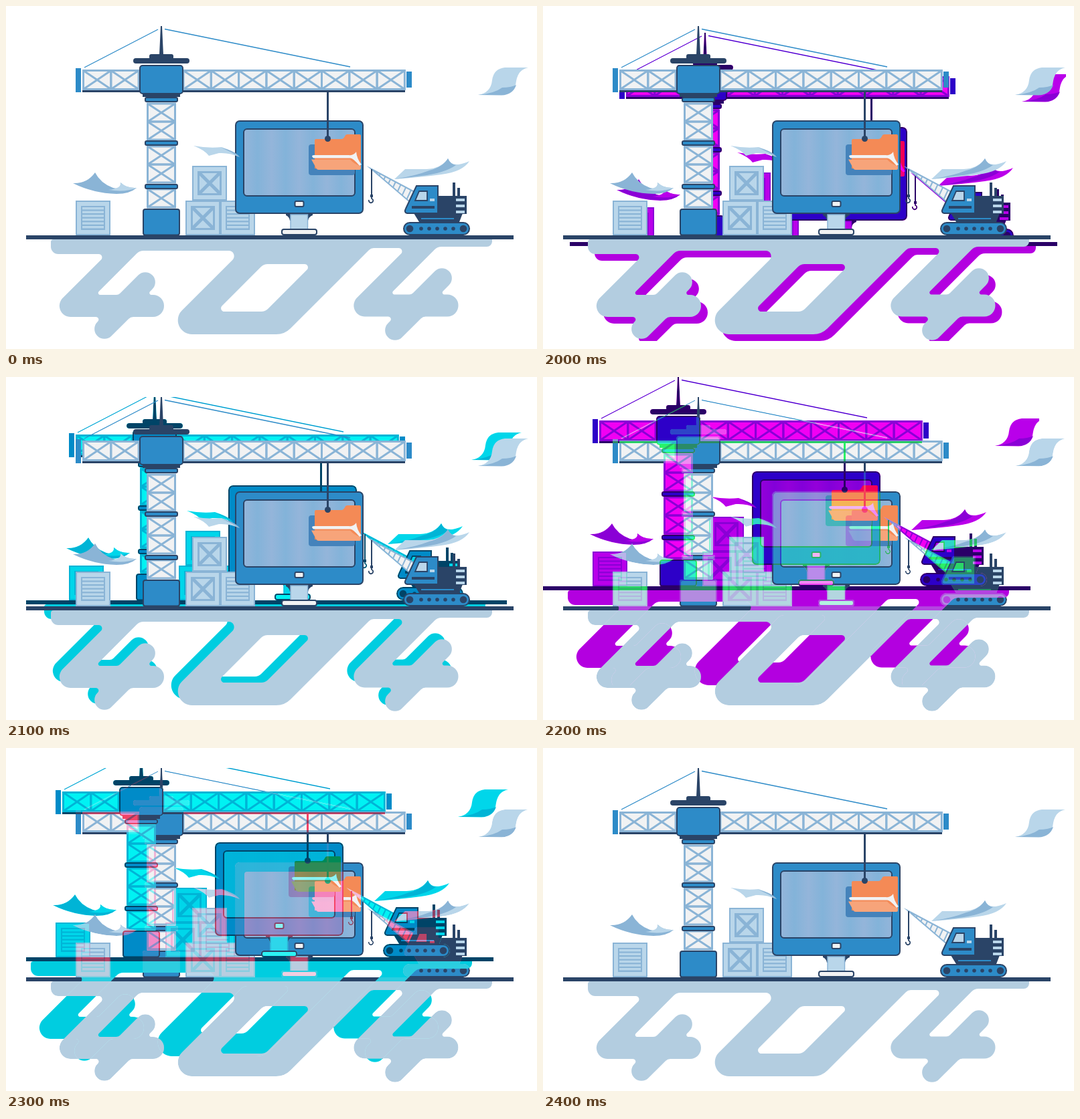
An HTML page with a canvas for the animation above (2500 ms loop, 793 px wide and 513 px high).

```html
<!DOCTYPE html>
<html lang="en">
<head>
<meta charset="utf-8">
<title>404</title>
<style>
  html, body { margin: 0; width: 100%; height: 100%; overflow: hidden; background: #fff; }
  canvas { display: block; width: 793px; height: 513px; }
</style>
</head>
<body>
<canvas id="stage" width="793" height="513"></canvas>
<script>
const W = 793, H = 513, LOOP = 2500;
const BLUE = '#2d8bc8', DARK = '#2a4467', MID = '#8ab4d6', LIGHT = '#b9d6ea',
      PALE = '#f1f2f3', GROUND = '#b3cde0', ORANGE = '#f48a56', PEACH = '#f7a47a';

function layer(paint) {
  const c = document.createElement('canvas');
  c.width = W;
  c.height = H;
  paint(c.getContext('2d'));
  return c;
}

let g;

function box(x, y, w, h, fill, r = 0, stroke, lw = 2) {
  g.beginPath();
  g.roundRect(x, y, w, h, r);
  if (fill) { g.fillStyle = fill; g.fill(); }
  if (stroke) { g.strokeStyle = stroke; g.lineWidth = lw; g.stroke(); }
}

function shape(d, fill, stroke, lw = 2) {
  const p = new Path2D(d);
  if (fill) { g.fillStyle = fill; g.fill(p); }
  if (stroke) { g.strokeStyle = stroke; g.lineWidth = lw; g.stroke(p); }
}

function dot(x, y, r, fill) {
  g.beginPath();
  g.arc(x, y, r, 0, 7);
  g.fillStyle = fill;
  g.fill();
}

// Cross-braced cell of a truss
function cell(x, y, w, h) {
  shape(`M${x},${y}l${w},${h}M${x + w},${y}l${-w},${h}`, null, MID, 3);
  box(x, y, w, h, null, 0, MID, 3);
}

// Polygon whose corners are [x, y, radius]
function rounded(pts) {
  const last = pts[pts.length - 1];
  g.moveTo((last[0] + pts[0][0]) / 2, (last[1] + pts[0][1]) / 2);
  pts.forEach(([x, y, r], i) => {
    const next = pts[(i + 1) % pts.length];
    g.arcTo(x, y, next[0], next[1], r);
  });
  g.closePath();
}

// All slanted edges lie on x + y = sum; a corner is where one meets height y
const at = (sum, y, r) => [sum - y, y, r];

// Round end of a slanted limb, pointing up right (dir 1) or down left (dir -1)
const tip = ([x, y], dir) => [[x + dir * 21, y, 14.8], [x, y - dir * 21, 14.8]];

// A four hanging from the bar, (x, y) is the left end of its crossbar
function four(x, y, tail, arm, barLeft, barRight) {
  const s = x + y, top = y - 16.5, bottom = y + 16.5;
  const ts = tail[0] + tail[1], as = arm[0] + arm[1];
  return [
    at(s - 24, barLeft, 5), at(s - 24, bottom, 16.5),
    at(ts - 21, bottom, 4), ...tip(tail, -1), at(ts + 21, bottom, 10),
    [x + 139, bottom, 16.4], [x + 139, top, 16.4],
    at(as + 21, top, 3), ...tip(arm, 1), at(as - 21, top, 8),
    at(s + 20, top, 3), at(s + 20, barRight, 14)
  ];
}

function digits() {
  g.beginPath();
  rounded([
    [67, 349, 4], [67, 371, 11],
    ...four(97, 448.5, [147, 483], [208, 413], 371, 366),
    at(718, 366, 8), at(718, 491, 21), at(907, 491, 30), at(907, 362, 10),
    ...four(536.5, 448, [581, 485], [651, 407], 362, 360),
    [726, 360, 8], [726, 349, 0]
  ]);
  rounded([at(771, 386, 14), at(844, 386, 5), at(844, 457, 14), at(771, 457, 5)]);
  g.fillStyle = GROUND;
  g.fill('evenodd');
}

function crate(x, y, slats) {
  box(x + 1, y + 1, 50, 50, LIGHT, 0, MID);
  if (slats) {
    box(x + 8, y + 8, 36, 36, MID);
    for (let i = 0; i < 6; i++) box(x + 10, y + 10 + i * 5.6, 32, 3.4, LIGHT);
  } else {
    shape(`M${x + 10},${y + 10}l32,32m0,-32l-32,32`, null, MID, 5);
    box(x + 9.5, y + 9.5, 33, 33, null, 0, MID, 3);
  }
}

function tower() {
  box(211, 140, 42, 165, PALE);
  for (let i = 0; i < 5; i++) cell(211.5, 146 + i * 27 + (i >> 1) * 10, 41, 27);
  box(205, 304, 54, 38.5, BLUE, 3, DARK);
  for (let y = 137; y < 270; y += 65) box(208, y, 48, 6, BLUE, 2, DARK);
  box(204, 130, 56, 6, DARK);
}

function truss(x, cells) {
  const step = 41.3;
  box(x, 96.5, step * cells, 28, PALE);
  for (let i = 0; i < cells; i++) cell(x + i * step, 96.5, step, 28);
}

function jib() {
  shape('M117,92L227,35M237,34.5L514,91', null, BLUE, 1.3);
  truss(115.5, 2);
  truss(265, 8);
  box(114, 126, 482, 3, DARK);
  box(104, 93, 8, 36, BLUE);
  box(598, 98, 8, 24, BLUE);
  box(200, 89, 64, 42, BLUE, 4, DARK);
  box(190, 78, 84, 8, DARK, 4);
  box(214, 72, 36, 8, DARK, 3);
  shape('M231,30H233L234,52L235,73H229L230,52Z', DARK);
}

function monitor() {
  box(343, 172, 190, 138, BLUE, 6, DARK);
  const glass = g.createLinearGradient(355, 0, 521, 0);
  for (let i = 0; i <= 8; i++) glass.addColorStop(i / 8, i % 2 ? '#83b3d9' : '#94b5da');
  box(355, 184, 166, 100, glass, 5, DARK);
  box(431.5, 292, 13, 8, PALE, 2, DARK);
  shape('M418,311H458V313Q452,315 451,321H424Q423,315 418,313Z', DARK);
  box(425, 312, 25.5, 22, LIGHT, 0, MID, 1.5);
  box(412, 334, 52, 8, PALE, 3, DARK);
}

function folder() {
  box(452, 207, 69, 46, '#4583bb', 4);
  shape('M461,201q0,-2 2,-2H501q3,0 5,-4q1,-3 4,-3H528q2,0 2,2V243H461Z', ORANGE);
  shape('M457,225q0,-2 3,-2L512,223Q519,224 523,218Q524,229 531,237L528,239Q518,227 514,227.5H459Z', PALE);
  shape('M456,229.5H514Q518,235 530,240V243q0,2 -2,2H467q-3,0 -4,-3Z', PEACH);
  box(479, 129, 3, 69, DARK);
  dot(480.5, 198.5, 4.5, DARK);
}

function digger() {
  // Boom and hook
  shape('M546,244L610,278L603,293Z', PALE, MID, 2);
  for (let t = 0.2; t < 1; t += 0.12) {
    shape(`M${546 + 64 * t},${244 + 34 * t}L${546 + 57 * t},${244 + 49 * t}`, null, MID, 2);
  }
  shape('M546,244V284', null, DARK, 2);
  box(544, 282, 4, 4, DARK);
  shape('M546,286V288A3.2,3.2 0 1 1 542,290', null, DARK, 1.8);

  // Engine and tracks
  box(667, 264, 4, 22, DARK);
  box(674, 272, 4, 14, DARK);
  box(644, 284, 44, 27, DARK);
  shape('M609,310H682L677,323H617Z', DARK);
  box(620, 317, 49, 2, BLUE);
  for (let y = 288; y < 310; y += 9) box(672, y, 13, 4, LIGHT);
  box(594, 324, 98, 18, BLUE, 9, DARK);
  for (const x of [603, 683]) dot(x, 333, 5.3, DARK);
  for (let x = 620; x < 670; x += 12) dot(x, 333, 2.8, DARK);

  // Cab
  shape('M613,269H645V310H599Q594,309 597,303Z', BLUE, DARK);
  shape('M617,277H629V291H611Z', LIGHT, DARK, 1.8);
  box(633, 288, 7, 4, LIGHT);
  box(606, 299, 34, 4, DARK);
}

function papers() {
  shape('M100,265Q121,266 133,249Q141,265 160,272Q172,275 171,264Q180,273 195,272Q185,281 165,281Q130,280 100,265Z', MID);
  shape('M171,264Q173,273 153,275Q178,279 195,272Q181,273 171,264Z', LIGHT);

  shape('M280,209Q302,213 322,211Q338,216 349,226Q334,219 318,220L303,224Q296,215 280,209Z', LIGHT);
  shape('M322,212Q336,218 349,226Q344,219 332,215Z', MID);

  shape('M580,259L596,244H628Q650,243 660,228Q663,238 676,237Q686,235 692,232Q682,248 650,252Q620,256 580,259Z', LIGHT);
  shape('M580,259Q612,254 632,246Q652,241 660,228Q664,237 672,238Q655,250 620,254Z', MID);

  shape('M780,92H745Q728,94 726,111Q724,130 705,133H740Q760,132 762,112Q765,95 780,92Z', LIGHT);
  shape('M705,133Q729,131 741,122Q754,122 762,118Q757,133 740,133.5Z', MID);
}

const scene = layer(ctx => {
  g = ctx;
  digits();
  box(30, 343, 728, 6, DARK);
  crate(104, 291, true);
  crate(278, 239, false);
  crate(268, 291, false);
  crate(320, 291, true);
  tower();
  jib();
  monitor();
  folder();
  digger();
  papers();
});

// Shifted copy of the scene with only some colour channels, cropped from `edge`
function ghost(dx, dy, keep, edge) {
  return layer(c => {
    c.beginPath();
    c.rect(edge, edge, 751, 471);
    c.clip();
    c.drawImage(scene, dx, dy);
    c.globalCompositeOperation = 'multiply';
    c.fillStyle = keep;
    c.fillRect(0, 0, W, H);
    c.globalCompositeOperation = 'destination-in';
    c.drawImage(scene, dx, dy);
  });
}

const behind = copy => layer(c => {
  c.drawImage(copy, 0, 0);
  c.drawImage(scene, 0, 0);
});

// The copy replaces its channels; the scene keeps the remaining ones
function swap(copy, rest) {
  const mask = layer(c => {
    c.drawImage(copy, 0, 0);
    c.globalCompositeOperation = 'source-in';
    c.fillStyle = rest;
    c.fillRect(0, 0, W, H);
  });
  return layer(c => {
    c.drawImage(scene, 0, 0);
    c.globalCompositeOperation = 'multiply';
    c.drawImage(mask, 0, 0);
    c.globalCompositeOperation = 'destination-in';
    c.drawImage(scene, 0, 0);
    c.globalCompositeOperation = 'lighter';
    c.drawImage(copy, 0, 0);
  });
}

const steps = [
  [0, scene],
  [2000, behind(ghost(10, 10, '#f0f', 30))],
  [2100, behind(ghost(-10, -9, '#0ff', 30))],
  [2200, swap(ghost(-30, -30, '#f0f', -10), '#0f0')],
  [2300, swap(ghost(-30, -30, '#0ff', 30), '#f00')],
  [2400, scene]
];

const out = document.getElementById('stage').getContext('2d');
const start = performance.now();
let shown = null;

function draw() {
  const t = Math.max(0, performance.now() - start) % LOOP;
  const now = steps.filter(s => s[0] <= t).pop()[1];
  if (now !== shown) {
    out.fillStyle = '#fff';
    out.fillRect(0, 0, W, H);
    out.drawImage(now, 0, 0);
    shown = now;
  }
  requestAnimationFrame(draw);
}
draw();
</script>
</body>
</html>
```
